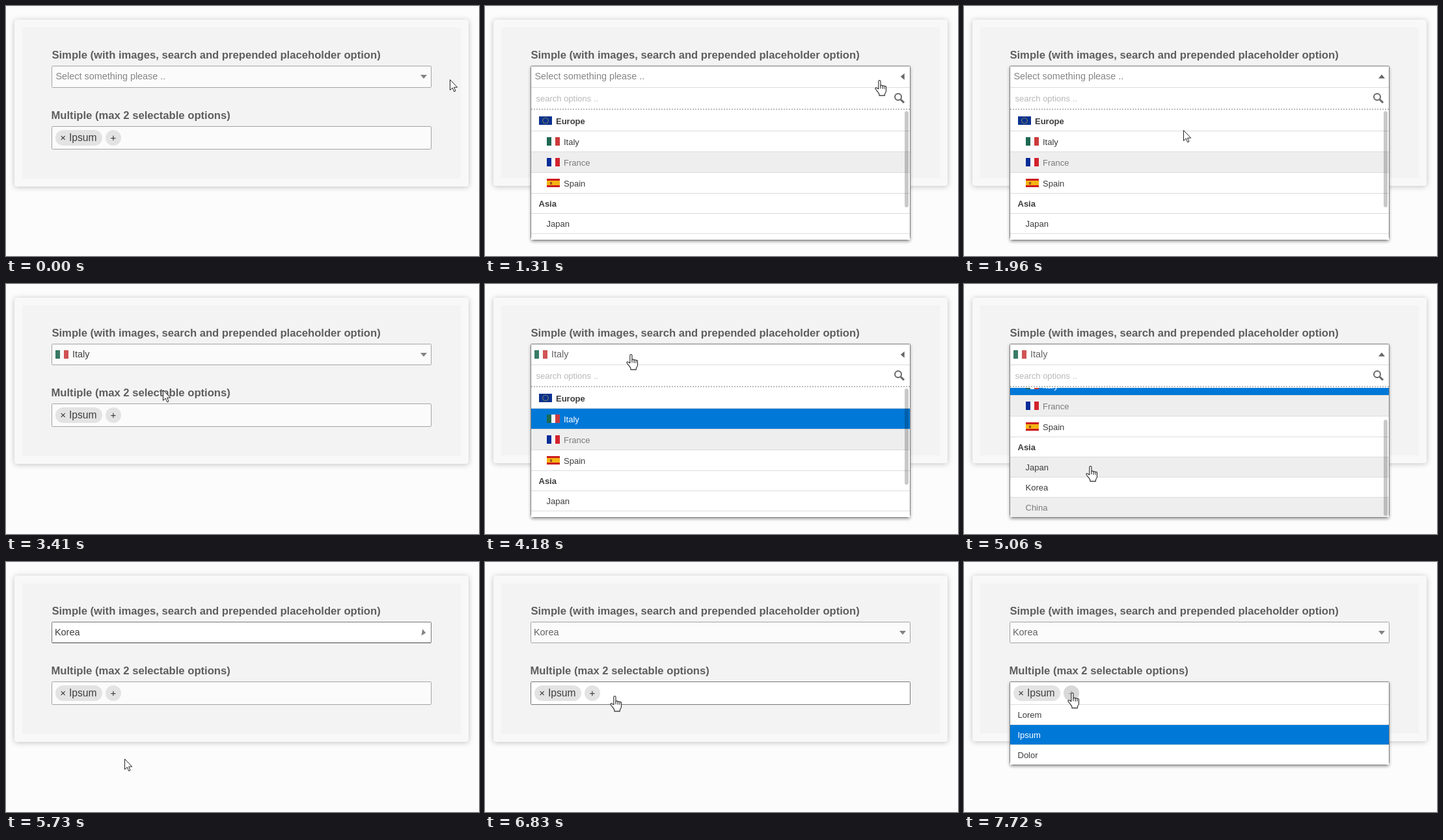
Recreate the animation shown at these times as an HTML page with a canvas. Size 727x385 px, loop 8 s.

```html
<!DOCTYPE html>
<html lang="en">
<head>
<meta charset="utf-8">
<title>Select boxes</title>
<style>
  html, body { margin: 0; width: 100%; height: 100%; overflow: hidden; background: #fcfcfc; }
  canvas { display: block; width: 727px; height: 385px; }
</style>
</head>
<body>
<canvas id="stage" width="727" height="385"></canvas>
<script>
const ctx = document.getElementById('stage').getContext('2d');
const LOOP = 8000;
const LEFT = 70, RIGHT = 654, WIDTH = RIGHT - LEFT;
const MAX_SCROLL = 52;
const FACE = '"Liberation Sans", Arial, sans-serif';
const BLUE = '#0078d7';

// Bursts of activity: start, end, number of steps.
const bursts = [
  [100, 210, 2], [660, 980, 4], [1310, 2080, 8], [2200, 2420, 3], [2970, 3730, 8],
  [3850, 3850, 1], [4180, 4940, 8], [5060, 5850, 8], [5950, 6730, 8], [6830, 6830, 1],
  [7280, 7720, 5]
];

// Pointer path: time, x, y of the hot spot.
const path = [
  [0, 682, 113], [100, 678, 121], [210, 675, 129], [660, 668, 126], [980, 606, 114],
  [1420, 606, 114], [1640, 485, 134], [1970, 337, 191], [2080, 325, 202], [2420, 318, 222],
  [3080, 318, 222], [3404, 241, 163], [3730, 224, 108], [4290, 224, 108], [4400, 218, 136],
  [4620, 204, 220], [4832, 195, 276], [4940, 194, 280], [5060, 194, 280], [5286, 184, 300],
  [5400, 182, 303], [5850, 182, 303], [6730, 197, 204], [6830, 199, 206], [7280, 199, 206],
  [7720, 166, 201]
];

const options = [
  { text: 'Europe', group: true, flag: 'europe' },
  { text: 'Italy', flag: 'italy' },
  { text: 'France', flag: 'france', off: true },
  { text: 'Spain', flag: 'spain' },
  { text: 'Asia', group: true },
  { text: 'Japan' },
  { text: 'Korea' },
  { text: 'China', off: true }
];

const handShape = new Path2D('M5.5 13V2a1.5 1.5 0 0 1 3 0V8.5a1.5 1.2 0 0 1 3 .5a1.4 1.2 0 0 1 2.7 .6' +
  'a1.2 1.2 0 0 1 2.3 .9V16c0 2-1.5 3-2 4.5V22.5H6.5V20.5C5.5 18 3 16 1 12.8C.3 11.5 1.8 10.5 3 11.5Z');
const handLines = new Path2D('M8.5 8.5v4M11.5 9v4M14.2 10v3');
const arrowShape = new Path2D('M.5.5V16.5L4.2 13L6.7 18.8L9 17.8L6.6 12.2H11.7Z');
const beamShape = new Path2D('M-3 .5h2.5M.5 .5h2.5M0 1v15M-3 16.5h2.5M.5 16.5h2.5');

const clamp = v => Math.max(0, Math.min(1, v));

function snap(t) {
  let out = 0;
  for (const [start, end, n] of bursts) {
    if (t < start) break;
    const gap = n > 1 ? (end - start) / (n - 1) : 1;
    out = Math.min(end, start + Math.floor((t - start) / gap + 0.2) * gap);
  }
  return out;
}

function pointerAt(t) {
  const i = path.findIndex(p => p[0] > t);
  if (i < 0) return path[path.length - 1].slice(1);
  const [t0, x0, y0] = path[i - 1], [t1, x1, y1] = path[i];
  const k = (t - t0) / (t1 - t0);
  return [x0 + (x1 - x0) * k, y0 + (y1 - y0) * k].map(Math.round);
}

function stateAt(t) {
  const first = t >= 1310 && t < 2970, second = t >= 4180 && t < 5700;
  const [x, y] = pointerAt(t);
  const value = t < 2970 ? null : t < 5700 ? options[1] : options[6];
  let angle = 0;
  for (const [open, close] of [[1310, 2970], [4180, 5730]]) {
    if (t >= open) angle = Math.PI * clamp(0.5 + (t - open) / 250);
    if (t >= close) angle = Math.PI * (1 + clamp(0.54 + (t - close) / 400));
  }
  const closedAt = t >= 5730 ? 5730 : t >= 2970 ? 2970 : -1e4;
  return {
    t, x, y, value, angle,
    open: first || second,
    multiOpen: t >= 7280,
    shift: value ? -1 : 0,
    scroll: t >= 4700 && second ? Math.round(MAX_SCROLL * clamp((t - 4640) / 290)) : 0,
    sinceClose: t - closedAt,
    hover: (t >= 870 && t < 1310) || (t >= 3850 && t < 4180)
  };
}

function rect(x, y, w, h, color) {
  ctx.fillStyle = color;
  ctx.fillRect(x, y, w, h);
}

function text(str, x, y, size, color, bold) {
  ctx.font = (bold ? 'bold ' : '') + size + 'px ' + FACE;
  ctx.fillStyle = color;
  ctx.fillText(str, x, y);
}

function box(x, y, w, h, r, fill, stroke) {
  ctx.beginPath();
  ctx.roundRect(x + 0.5, y + 0.5, w - 1, h - 1, r);
  ctx.fillStyle = fill;
  ctx.fill();
  ctx.lineWidth = 1;
  ctx.strokeStyle = stroke;
  ctx.stroke();
}

// A filled rounded box that casts a soft shadow.
function raised(x, y, w, h, r, fill, shade, blur, dy) {
  ctx.save();
  ctx.shadowColor = shade;
  ctx.shadowBlur = blur;
  ctx.shadowOffsetY = dy;
  ctx.beginPath();
  ctx.roundRect(x, y, w, h, r);
  ctx.fillStyle = fill;
  ctx.fill();
  ctx.restore();
}

function circle(x, y, r, color) {
  ctx.beginPath();
  ctx.arc(x, y, r, 0, Math.PI * 2);
  ctx.fillStyle = color;
  ctx.fill();
}

function flag(kind, x, y) {
  const stripes = (...c) => c.forEach((color, i) => rect(x + [0, 7, 13][i], y, 7, 13, color));
  if (kind === 'italy') stripes('#1c6850', '#fafafa', '#cb3a3c');
  if (kind === 'france') stripes('#062c98', '#fafafa', '#d2222c');
  if (kind === 'spain') {
    rect(x, y, 20, 13, '#cc1a1e');
    rect(x, y + 3, 20, 7, '#f4b414');
    rect(x + 5, y + 5, 3, 4, '#a2521c');
  }
  if (kind === 'europe') {
    rect(x, y, 20, 13, '#0a318f');
    for (let i = 0; i < 12; i++) {
      const a = i * Math.PI / 6;
      circle(x + 10 + Math.cos(a) * 4.3, y + 6.5 + Math.sin(a) * 4.3, 0.65, '#d8c23c');
    }
  }
}

function panel(s) {
  rect(0, 0, 727, 385, '#fcfcfc');
  const bottom = 278 + s.shift - (s.open || s.multiOpen ? 1 : 0);
  raised(13, 21, 698, bottom - 21, 4, '#f8f8f8', 'rgba(0,0,0,.24)', 8, 1);
  rect(25, 33, 674, bottom - 45, '#f3f3f3');
  text('Simple (with images, search and prepended placeholder option)', 70.4, 81, 16.64, '#5e5e5e', true);
  text('Multiple (max 2 selectable options)', 69.5, 174 + s.shift, 16.64, '#5e5e5e', true);
}

function dropFrame(y, bottom) {
  const radii = [1, 1, 4, 4];
  raised(LEFT, y, WIDTH, bottom - y, radii, '#fff', 'rgba(0,0,0,.36)', 4, 2);
  box(LEFT, y, WIDTH, bottom - y, radii, '#fff', '#808080');
}

function row(o, top, h, look) {
  const sep = top + h - 1;
  const fill = look.selected ? BLUE : o.off || look.hover ? '#eeeeee' : '#fff';
  const color = look.selected ? '#fff' : o.off ? '#7a7a7a' : '#3c3c3c';
  rect(LEFT + 1, top, WIDTH - 2, look.last ? h - 1 : h, fill);
  if (!look.last) rect(LEFT + 1, sep, WIDTH - 2, 1, '#dcdcdc');
  const x = o.group || look.flat ? 83 : 95;
  if (o.flag) flag(o.flag, x, sep - 22);
  text(o.text, x + (o.flag ? 26 : -0.5), sep - 10, 13, color, o.group);
}

function magnifier(x, y) {
  ctx.strokeStyle = '#666';
  ctx.lineWidth = 2;
  ctx.beginPath();
  ctx.arc(x, y, 5, 0, Math.PI * 2);
  ctx.stroke();
  ctx.lineWidth = 3;
  ctx.beginPath();
  ctx.moveTo(x + 4, y + 4);
  ctx.lineTo(x + 9, y + 9);
  ctx.stroke();
}

function dropList(s) {
  const d = s.shift, top = 161 + d, end = 360 + d;
  dropFrame(92, 361 + d);
  rect(LEFT + 1, 125 + d, WIDTH - 2, 1, '#dcdcdc');
  text('search options ..', 78.5, 147 + d, 13, '#b8b8b8');
  magnifier(635, 140 + d);
  for (let x = LEFT + 1; x < RIGHT - 2; x += 4) rect(x, 158 + d, 2, 2, '#bbb');

  ctx.save();
  ctx.beginPath();
  ctx.rect(LEFT + 1, top, WIDTH - 2, end - top);
  ctx.clip();
  let y = top - s.scroll;
  options.forEach((o, i) => {
    const h = i < 4 ? 32 : 31;
    const hover = !o.group && s.y >= Math.max(y, top) && s.y < y + h;
    row(o, y, h, { hover, selected: o === s.value, last: i === options.length - 1 });
    if (hover && !o.off) s.overOption = true;
    y += h;
  });
  ctx.restore();

  ctx.beginPath();
  ctx.roundRect(645, top + 1 + s.scroll * 48 / MAX_SCROLL, 6, 148, 3);
  ctx.fillStyle = 'rgba(0,0,0,.21)';
  ctx.fill();
}

function simple(s) {
  const fading = s.sinceClose >= 0 && s.sinceClose < 200;
  const fresh = s.sinceClose < 450;
  if (s.open) {
    dropList(s);
  } else {
    const lit = s.hover || fading;
    box(LEFT, 92, WIDTH, 34 + s.shift, 1, lit ? '#fff' : '#fbfbfb', lit ? '#777' : '#a4a4a4');
    if (fading) rect(LEFT + 1, 124, WIDTH - 2, 1, '#444');
  }
  if (!s.value) {
    text('Select something please ..', 76.5, 113, 14.4, '#858585');
  } else {
    if (s.value.flag) {
      ctx.globalAlpha = 0.87;
      flag(s.value.flag, 76, 102);
      ctx.globalAlpha = 1;
    }
    text(s.value.text, s.value.flag ? 102 : 75, 113, 14.4, fresh ? '#3c3c3c' : '#626262');
  }
  ctx.save();
  ctx.translate(642, 108.7);
  ctx.rotate(s.angle);
  ctx.beginPath();
  ctx.moveTo(-5, -2.7);
  ctx.lineTo(5, -2.7);
  ctx.lineTo(0, 3.2);
  ctx.fillStyle = s.open ? '#666' : '#828282';
  ctx.fill();
  ctx.restore();
}

function multiple(s) {
  const y = 185 + s.shift;
  if (s.multiOpen) {
    dropFrame(y, 313);
    rect(LEFT + 1, 219, WIDTH - 2, 1, '#dcdcdc');
    ['Lorem', 'Ipsum', 'Dolor'].forEach((name, i) =>
      row({ text: name }, 220 + i * 31, 31, { flat: true, selected: i === 1, last: i === 2 }));
  } else {
    const lit = s.t >= 6500;
    box(LEFT, y, WIDTH, 36, 1, lit ? '#fff' : '#fbfbfb', lit ? '#777' : '#a4a4a4');
  }
  ctx.beginPath();
  ctx.roundRect(76, y + 6, 72, 24, 12);
  ctx.fillStyle = '#e3e3e3';
  ctx.fill();
  const onPlus = Math.hypot(s.x - 165, s.y - y - 18) < 12;
  circle(165, y + 18, 12, onPlus ? '#d8d8d8' : '#e3e3e3');
  text('Ipsum', 97, y + 23, 15.6, '#3f3f3f');
  ctx.textAlign = 'center';
  text('×', 87.7, y + 23, 15, '#333');
  text('+', 165, y + 23, 15, onPlus ? '#999' : '#333');
  ctx.textAlign = 'left';
}

function pointer(s) {
  const inside = s.x >= LEFT && s.x < RIGHT;
  const between = (a, b) => inside && s.y >= a && s.y < b;
  const beam = s.open && between(126, 158);
  const hand = s.open ? between(92, 126) || s.overOption
    : between(92, 125) || between(185 + s.shift, 220);
  ctx.save();
  ctx.lineWidth = 1;
  ctx.lineJoin = 'round';
  ctx.strokeStyle = '#222';
  ctx.fillStyle = '#fff';
  if (beam) {
    ctx.translate(s.x + 0.5, s.y - 8);
    ctx.stroke(beamShape);
  } else if (hand) {
    ctx.translate(s.x - 7, s.y);
    ctx.scale(1.06, 1.06);
    ctx.fill(handShape);
    ctx.stroke(handShape);
    ctx.stroke(handLines);
  } else {
    ctx.translate(s.x, s.y);
    ctx.fill(arrowShape);
    ctx.stroke(arrowShape);
  }
  ctx.restore();
}

function draw(now) {
  const s = stateAt(snap(now % LOOP));
  panel(s);
  multiple(s);
  simple(s);
  pointer(s);
}

const begin = performance.now();
function frame() {
  draw(performance.now() - begin);
  requestAnimationFrame(frame);
}
frame();
</script>
</body>
</html>
```
